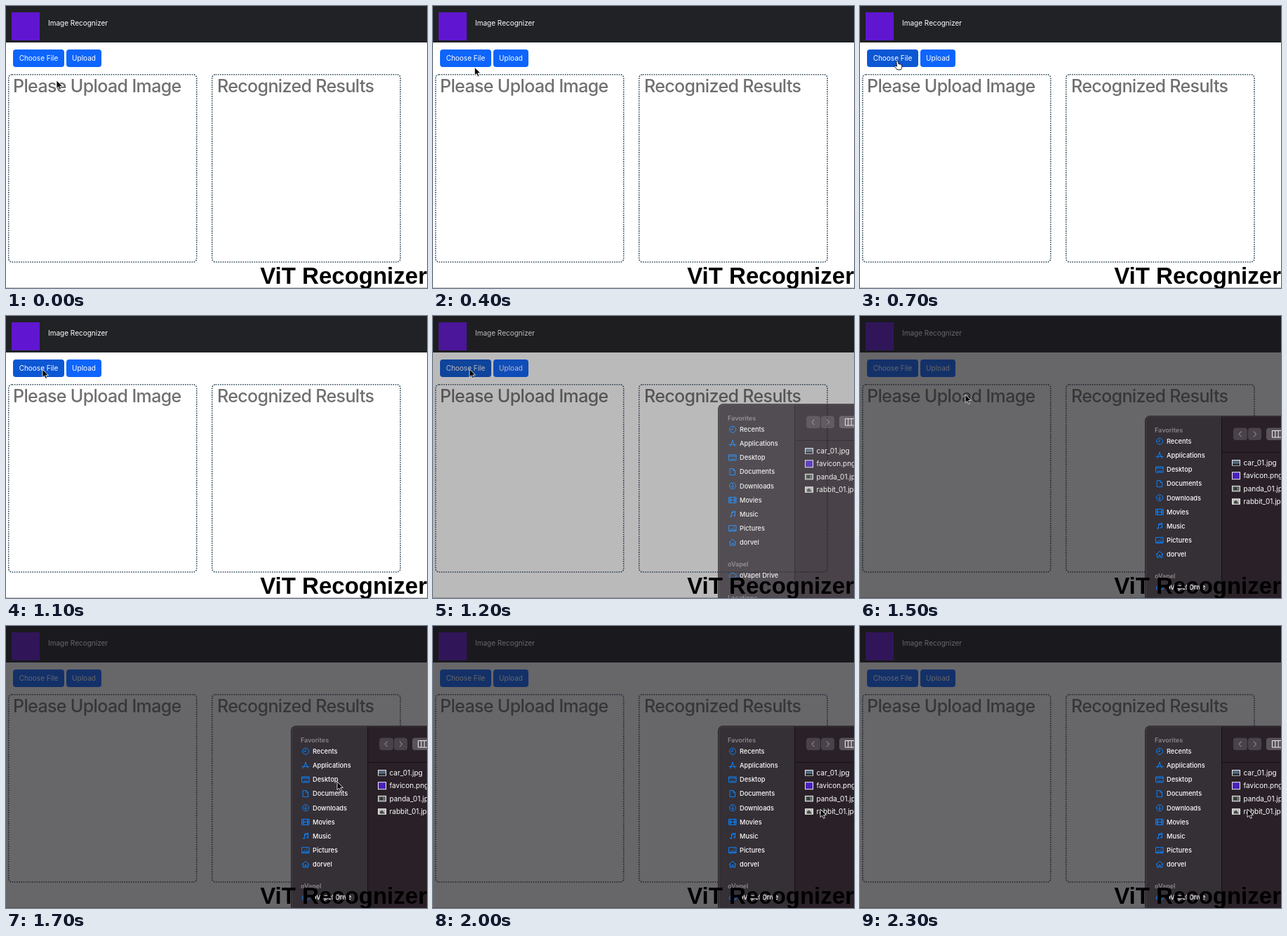
An HTML page that plays this animation: 600 px wide and 402 px high, repeating every 2400 ms.

```html
<!DOCTYPE html>
<html lang="en">
<head>
<meta charset="utf-8">
<title>Image Recognizer</title>
<style>
  html, body { margin: 0; height: 100%; overflow: hidden; background: #fff; }
  svg { display: block; width: 100vw; height: 100vh; }
  text { font: 400 10px Inter, sans-serif; fill: #fff; white-space: pre; }
  .title { font-size: 25px; font-weight: 500; letter-spacing: -.63px; fill: #707070; }
  .box { fill: none; stroke: #2f4a58; stroke-width: 1.6; stroke-dasharray: 1.6; }
  .side { font-size: 9.2px; font-weight: 500; }
  .head { font-size: 9px; font-weight: 600; fill: #8b858a; }
  .icon { fill: none; stroke: #0a84ff; stroke-linejoin: round; stroke-linecap: round; }
  .brand { font: 700 33px "Liberation Sans", Arial, sans-serif; fill: #000; text-anchor: end; }
</style>
</head>
<body>
<svg viewBox="0 0 600 402" preserveAspectRatio="none">
  <rect width="600" height="402" fill="#fff"/>
  <rect width="600" height="52" fill="#202225"/>
  <rect x="8" y="9" width="40" height="40" fill="#6016d0"/>
  <text x="60" y="28">Image Recognizer</text>

  <rect id="choose" x="10" y="62" width="73" height="25" rx="4"/>
  <rect x="86" y="62" width="50" height="25" rx="4" fill="#0d65fc"/>
  <text x="46.5" y="78" text-anchor="middle">Choose File</text>
  <text x="111" y="78" text-anchor="middle">Upload</text>

  <rect class="box" x="3.7" y="97.7" width="268" height="267.3" rx="5"/>
  <rect class="box" x="293.7" y="97.7" width="268.3" height="267.3" rx="5"/>
  <text class="title" x="10" y="123">Please Upload Image</text>
  <text class="title" x="301" y="123">Recognized Results</text>
  <rect y="401" width="600" height="1" fill="#c8c8c8"/>

  <rect id="dim" width="600" height="402" fill="#18161a"/>

  <g id="dialog">
    <rect x="406" y="142" width="300" height="300" rx="8" fill="#1c191d"/>
    <rect x="407.3" y="143" width="300" height="300" rx="7" fill="#352f36" stroke="#5b555b" stroke-width=".7"/>
    <path d="M516 143.4H600V420H516Z" fill="#2a2128"/>
    <path d="M515.5 143.4V420M516 194.5H600" stroke="#141114"/>
    <rect x="532" y="159.5" width="20" height="17.5" rx="4" fill="#4a424a"/>
    <rect x="553" y="159.5" width="19" height="17.5" rx="4" fill="#4a424a"/>
    <rect x="579" y="159.5" width="40" height="17.5" rx="4" fill="#5a535a"/>
    <path d="M543.5 164.5l-3.5 3.8 3.5 3.8M561 164.5l3.5 3.8-3.5 3.8" fill="none" stroke="#857e85" stroke-width="1.2"/>
    <path d="M587.5 163.5h13v9.5h-13zM591.8 163.5v9.5M596.2 163.5v9.5" fill="none" stroke="#eee"/>
    <text class="head" x="420" y="165.5">Favorites</text>
    <text class="head" x="420" y="374.3">oVapel</text>
    <text class="head" x="420" y="421.5">Locations</text>
  </g>

  <text class="brand" x="600" y="396">ViT Recognizer</text>

  <g id="cursor">
    <path id="arrow" d="M0 0V11.6L2.7 9.1 4.5 13.3 6.5 12.4 4.7 8.4H8.4Z" fill="#000" stroke="#fff" stroke-width=".8"/>
    <path id="hand" d="M-1.2.8Q0-.8 1.2.6L2 4.6Q3 4 3.7 5 5 4.6 5.4 5.7 7 5.6 6.8 7.6 6.8 10 5.4 12.8H-.2Q-1.6 10.4-3.8 8.2-4 6.6-2.2 7.2L-.6 8.2Z" fill="#fff" stroke="#000" stroke-width=".9"/>
  </g>
</svg>
<script>
const $ = id => document.getElementById(id);
const [choose, dim, dialog, cursor, arrow, hand] =
  ['choose', 'dim', 'dialog', 'cursor', 'arrow', 'hand'].map($);

function add(tag, attrs, text = '') {
  const el = document.createElementNS('http://www.w3.org/2000/svg', tag);
  for (const name in attrs) el.setAttribute(name, attrs[name]);
  el.textContent = text;
  dialog.append(el);
}

// Sidebar icons are drawn around their own centre
const places = [
  ['Recents', 'M-4.5 0a4.5 4.5 0 1 0 9 0a4.5 4.5 0 1 0-9 0M0-2.5V.3H-2.3'],
  ['Applications', 'M.5-4.5L-3.5 4M-.5-4.5L3.5 4M-5 1.6H5'],
  ['Desktop', 'M-5-4H5V4H-5ZM-5-2H5M-3 2.2H3'],
  ['Documents', 'M-3.5-4.5H.8L3.5-1.8V4.5H-3.5ZM.8-4.5V-1.8H3.5'],
  ['Downloads', 'M-4.5 0a4.5 4.5 0 1 0 9 0a4.5 4.5 0 1 0-9 0M0-2.3V2.2M-1.8.5L0 2.3 1.8.5'],
  ['Movies', 'M-5-4H5V4H-5ZM-2.7-4V4M2.7-4V4M-2.7 0H2.7M-5-1.3h2M-5 1.3h2M3-1.3h2M3 1.3h2'],
  ['Music', 'M-1.5 3V-3L3.5-4.3V1.8M-1.5-1.5L3.5-2.8M-3.6 3.2a1 .8 0 1 0 2.1 0a1 .8 0 1 0-2.1 0M1.4 2a1 .8 0 1 0 2.1 0a1 .8 0 1 0-2.1 0'],
  ['Pictures', 'M-5-4H5V4H-5ZM-4 3L-1 0 1 2 2.5.7 4.2 3ZM1.8-1.8h.6'],
  ['dorvel', 'M-5 0L0-4.5 5 0M-3.6-1V4.3H-1V1H1V4.3H3.6V-1'],
  ['oVapel Drive', 'M-3 3.2a2.2 2.2 0 0 1-.2-4.3a3 3 0 0 1 5.7-.8a2.5 2.5 0 0 1 .6 5.1Z']
];
places.forEach(([name, d], i) => {
  const y = i < 9 ? 178.6 + 20.15 * i : 386.8;
  add('path', { class: 'icon', d, transform: `translate(427 ${y})` });
  add('text', { class: 'side', x: 437, y: y + 3.3 }, name);
});

const files = [
  ['car_01.jpg', '#52677c', 'M531 1.5h10v2h-10z', '#1d2026'],
  ['favicon.png', '#4a20bd', '', 'none'],
  ['panda_01.jpg', '#66706a', 'M533-2h4v4h-4z', '#303531'],
  ['rabbit_01.jpg', '#b9bcb8', 'M533 3v-3l3-2 4 5z', '#454944']
];
files.forEach(([name, fill, d, ink], i) => {
  const y = 209.3 + 18.4 * i, h = name.endsWith('png') ? 10 : 7.5;
  add('rect', { x: 530.5, y: y - h / 2, width: 11, height: h, fill, stroke: '#eee' });
  if (d) add('path', { d, fill: ink, transform: `translate(0 ${y})` });
  add('text', { x: 546.5, y: y + 3.5 }, name);
});

// time, x, y of the pointer tip
const path = [
  [0, 72, 106], [600, 53, 78], [900, 53, 78], [1100, 52, 76], [1400, 52, 75],
  [1500, 150, 112], [1600, 340, 180], [1700, 472, 222], [1800, 522, 244],
  [2000, 552, 261], [2400, 552, 261]
];

function pointer(t) {
  const i = path.findIndex(p => p[0] > t);
  const [t0, x0, y0] = path[i - 1], [t1, x1, y1] = path[i];
  const k = (t - t0) / (t1 - t0);
  return [x0 + (x1 - x0) * k, y0 + (y1 - y0) * k];
}

function draw(now) {
  const t = Math.floor(now % 2400 / 100) * 100;
  const [x, y] = pointer(t);
  const hover = y < 87 && x < 83;
  const pointing = hover && t < 1100;
  const opening = t === 1200, open = t > 1200;

  cursor.setAttribute('transform', `translate(${x} ${y})`);
  hand.style.display = pointing ? '' : 'none';
  arrow.style.display = pointing ? 'none' : '';
  choose.style.fill = hover ? '#0c57d3' : '#0d65fc';
  dim.style.opacity = open ? .655 : opening ? .295 : 0;
  dialog.style.opacity = open ? 1 : opening ? .78 : 0;
  dialog.setAttribute('transform', `translate(0 ${open ? 0 : -17})`);
}

const start = performance.now();
(function loop() {
  draw(performance.now() - start);
  requestAnimationFrame(loop);
})();
</script>
</body>
</html>
```
